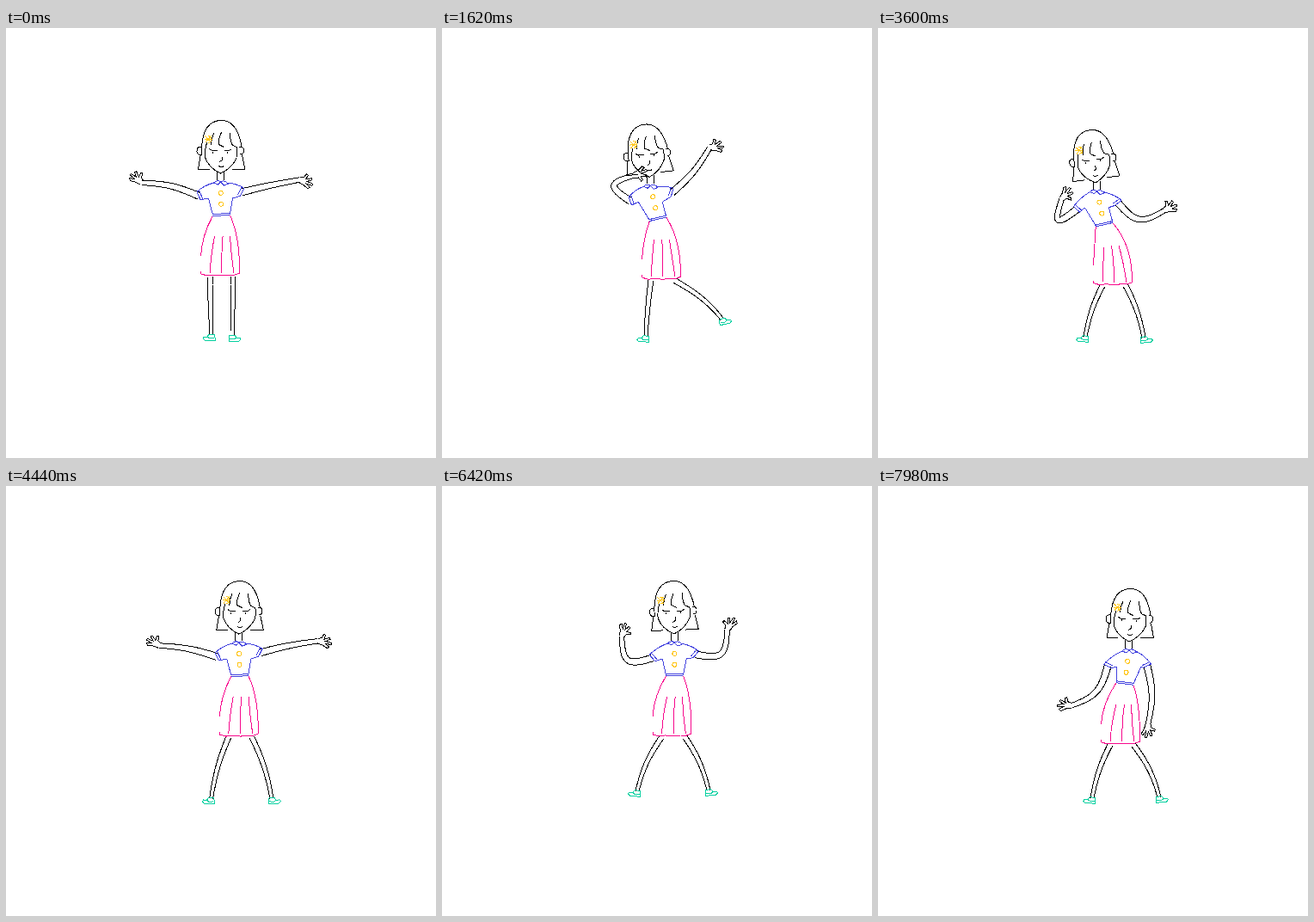
An HTML page for the animation above (8 s loop, 500x500 px).

```html
<!DOCTYPE html>
<html lang="en">
<head>
<meta charset="utf-8">
<title>Dancing girl</title>
<style>
html, body { margin: 0; width: 100%; height: 100%; overflow: hidden; background: #fff; }
svg { display: block; width: 100vw; height: 100vh; }
path { fill: none; stroke-width: 1; shape-rendering: crispEdges; }
.ink { stroke: #000; }
.shirt { stroke: #4343df; }
.skirt { stroke: #f7088c; }
.shoes { stroke: #06d0a0; }
.gold { stroke: #ffc619; }
</style>
</head>
<body>
<svg viewBox="0 0 500 500">
  <path id="limbs" class="ink"/>
  <path id="shoes" class="shoes"/>
  <path id="skirt" class="skirt"/>
  <path id="shirt" class="shirt"/>
  <path id="buttons" class="gold"/>
  <g id="head">
    <path class="ink" d="M-13 22H-26Q-24 8 -23 5M-22 -4Q-20 -35 1 -35Q16 -35 22 -15Q24 -9 24.5 -4M25 5L28.5 22H13"/>
    <path class="ink" d="M-22 -4Q-28 -5 -27.500 1Q-27 6 -22 5ZM22 -4Q28 -5 27 1Q26 5 23 4"/>
    <path class="ink" d="M-16 -9Q-19 2 -18 8Q-14 20 0 26.5Q13 21 19 8Q20 0 19 -4"/>
    <path class="ink" d="M-8 -20Q-11 -14 -11 -7M1 -21Q-3 -13 -2 -7L4 -4M11 -21Q11 -10 14 -6L19 -4"/>
    <path class="ink" d="M-13 -2L-10 0H-4M4 0H10L13 -2M-9 1v2M8 1v2M2 7V11L-1 13M-2 18q3 2 6 0"/>
    <path class="gold" d="M-18 -17L-11 -9M-11 -17L-18 -9M-19 -13H-10M-15 -17q4 0 4 4t-4 4"/>
  </g>
</svg>
<script>
const LOOP = 8000, STEP = 30;

// Arms out wide: time, head x, head y, left foot x, right foot x, foot y
const wide = (t, x, y, left, right, foot) =>
  [t, x, y, 0, x + 1, x, -18, -4, -30, -15, -8, 8, left, foot, right, foot];

// time | head x, y, tilt | waist x, hem x | left arm: upper, fore, hand | right arm | left foot | right foot
// Arm angles are measured from straight out to the side, positive downwards.
const poses = [
  [0, 249.5, 142.5, 0, 250.5, 249, -23, -3, -40, -14, -10, 17, 239, 357, 263, 358],
  wide(800, 243, 143, 237, 275, 359),
  [1620, 238.5, 147, -6, 251, 255, -33, -164, -162, -41, -59, -8, 237, 359, 326, 339],
  [2460, 288.5, 154, -5, 294, 291, -28, -162, -165, -36, -46, -3, 238, 354, 342, 357],
  [2790, 293, 155, -3, 296, 290, -15, -150, -155, -22, -22, 0, 239, 356, 338, 359],
  [3600, 250, 153.5, -7, 263, 273, 38, -108, -130, 50, -31, -27, 241, 359, 309, 360],
  wide(4110, 268, 147, 240, 309, 365),
  wide(4800, 274, 144, 237, 309, 362),
  [5280, 284.5, 148, 0, 281, 277, 25, -185, -170, 38, 107, 95, 234, 354, 308, 360],
  [5800, 276, 139, -1, 274, 272, -15, -60, -70, -12, -55, -50, 229, 356, 309, 358],
  [6420, 269, 145.5, -2, 270.5, 267.5, 18, -88, -110, 12, -88, -63, 227, 355, 310, 354],
  wide(6930, 283, 140, 238, 318, 359),
  [7980, 292.5, 154.5, 1, 287, 282, 75, 20, -4, 76, 102, 95, 249, 363, 327, 362]
];

const rad = deg => deg * Math.PI / 180;
const mix = (a, b, k) => a + (b - a) * k;
const mixPt = (a, b, k) => [mix(a[0], b[0], k), mix(a[1], b[1], k)];
const move = (p, x, y) => [p[0] + x, p[1] + y];
const txt = p => p[0].toFixed(1) + ' ' + p[1].toFixed(1);
const line = (...pts) => 'M' + pts.map(txt).join('L');
const quad = (a, c, b) => `M${txt(a)}Q${txt(c)} ${txt(b)}`;
const polar = (side, deg, r) => [side * r * Math.cos(rad(deg)), r * Math.sin(rad(deg))];
const turn = (x, y, angle) => [
  x * Math.cos(angle) - y * Math.sin(angle),
  x * Math.sin(angle) + y * Math.cos(angle)
];
const show = (id, d) => document.getElementById(id).setAttribute('d', d);

function poseAt(t) {
  let i = 0;
  while (i < poses.length - 2 && t >= poses[i + 1][0]) i++;
  const a = poses[i], b = poses[i + 1];
  const k = Math.min(1, (t - a[0]) / (b[0] - a[0]));
  return a.map((v, n) => mix(v, b[n], k * k * (3 - 2 * k)));
}

// Two outlines running along a limb that bends at a joint
function tube(start, joint, end, pull, wide, narrow) {
  const c1 = mixPt(start, joint, pull), c2 = mixPt(end, joint, pull);
  const at = k => {
    const p = mixPt(start, c1, k), q = mixPt(c1, c2, k), r = mixPt(c2, end, k);
    return mixPt(mixPt(p, q, k), mixPt(q, r, k), k);
  };
  const sides = [[], []];
  for (let i = 0; i <= 16; i++) {
    const k = i / 16, p = at(k), a = at(k - .01), b = at(k + .01);
    const angle = Math.atan2(b[1] - a[1], b[0] - a[0]), w = mix(wide, narrow, k);
    sides[0].push(move(p, -w * Math.sin(angle), w * Math.cos(angle)));
    sides[1].push(move(p, w * Math.sin(angle), -w * Math.cos(angle)));
  }
  return line(...sides[0]) + line(...sides[1]);
}

// Places a small outline, mirrored for the left side
const stamp = (shape, origin, side, angle) => line(...shape.map(([x, y]) => {
  const [px, py] = turn(x, y, angle);
  return move(origin, side * px, py);
}));

const HAND = [[0, -3], [4, -4], [6, -9], [8, -8], [7, -3], [13, -6], [14, -4], [9, -1],
  [16, 0], [16, 2], [9, 2], [14, 5], [12, 7], [6, 4], [0, 3]];
const SHOE = [[-3, -1], [-4, 3], [-4, 6], [8, 6], [10, 4], [9, 2], [5, 2], [3, -1], [-3, -1]];
const STRAP = [[-3, 3], [2, 4], [5, 2]];

function arm(side, collar, lean, [upper, fore, hand]) {
  const [sx, sy] = turn(side * (side < 0 ? 23 : 21), side < 0 ? 17 : 13, lean / 2);
  const shoulder = move(move(collar, sx, sy), ...polar(side, upper, side < 0 ? 3 : 4));
  const length = 34 + 2.5 * Math.abs(Math.sin(rad(fore - upper) / 2));
  const elbow = move(shoulder, ...polar(side, upper, length));
  const wrist = move(elbow, ...polar(side, fore, length));

  const cuff = polar(side, 123 + .41 * upper, 5);
  const top = move(shoulder, -cuff[0], -cuff[1]), bottom = move(shoulder, ...cuff);
  const inset = [-side * Math.abs(cuff[1]) * .6, -Math.abs(cuff[0]) * .6];
  const neck = move(collar, side * 8, 1), armpit = move(collar, side * 14, 19);
  return {
    ink: tube(shoulder, elbow, wrist, .85, 4, 2.7) + stamp(HAND, wrist, side, rad(hand)),
    sleeve: quad(neck, move(mixPt(neck, top, .5), side * 2, -2), top) +
      line(top, bottom, armpit) + line(move(top, ...inset), move(bottom, ...inset)),
    armpit
  };
}

function leg(side, hem, foot) {
  const hip = move(hem, side < 0 ? -12 : 15, 2);
  const dx = foot[0] - hip[0];
  const bulge = Math.min(8, Math.abs(dx) * .22);
  const knee = move(mixPt(hip, foot, .5), side * bulge, -bulge / 3);
  const tilt = -Math.max(0, side * Math.atan2(dx, foot[1] - hip[1])) * .25;
  return {
    ink: tube(hip, knee, foot, .75, 3, 2),
    shoe: stamp(SHOE, foot, side, tilt) + stamp(STRAP, foot, side, tilt)
  };
}

function drawSkirt(waist, belt, hem) {
  const at = (x, y) => move(hem, x, y);
  const left = move(waist, -belt[0], -belt[1] + 1), right = move(waist, belt[0], belt[1] + 1);
  const middle = mixPt(waist, hem, .6)[0];
  const pleats = [[-7, -12], [2.5, 2], [11, 16]].map(([top, bottom]) =>
    quad([middle + top, waist[1] + 25], [hem[0] + (top + bottom) / 2 - 1, waist[1] + 45], at(bottom, -2)));
  show('skirt', quad(left, at(-21, -46), at(-22.5, -22)) +
    quad(right, at(23, -45), at(22.5, -2)) + pleats.join('') +
    line(at(-22.5, -4), at(-22, -1), at(-15, 1), at(-8, 0), at(2, 1), at(10, 0), at(17, 0), at(22.5, -2)));
}

function draw(t) {
  const [, hx, hy, tilt, waistX, hemX, ...rest] = poseAt(t);
  const collar = move([hx, hy], ...turn(0, 36.5, rad(tilt)));
  const waist = [waistX, collar[1] + 38], hem = [hemX, collar[1] + 108];
  const lean = -Math.atan2(waist[0] - collar[0], 38);
  const belt = turn(10, 0, lean);
  const at = (x, y) => move(collar, x, y);

  const arms = [arm(-1, collar, lean, rest.slice(0, 3)), arm(1, collar, lean, rest.slice(3, 6))];
  const legs = [leg(-1, hem, rest.slice(6, 8)), leg(1, hem, rest.slice(8, 10))];
  const left = move(waist, -belt[0], -belt[1]), right = move(waist, ...belt);

  document.getElementById('head').setAttribute('transform',
    `translate(${hx.toFixed(1)} ${hy.toFixed(1)}) rotate(${tilt.toFixed(2)})`);
  show('limbs', [...arms, ...legs].map(part => part.ink).join('') +
    line(at(-4, -12), at(-4, -2)) + line(at(4, -12), at(4, -2)));
  show('shoes', legs.map(part => part.shoe).join(''));
  show('shirt', arms.map(part => part.sleeve).join('') +
    line(arms[0].armpit, left) + line(arms[1].armpit, right) +
    line(move(left, 0, -1), move(right, 0, -1)) + line(move(left, 0, 1), move(right, 0, 1)) +
    quad(at(-8, 1), at(-4, -3), at(0, 0)) + quad(at(0, 0), at(4, -3), at(9, 2)) +
    line(at(-8, 1), at(-3, 3), at(0, 0), at(4, 4), at(9, 2)));
  show('buttons', [.34, .68].map(k =>
    `M${txt(move(mixPt(collar, waist, k), -2.5, 0))}a2.5 2.5 0 1 1 5 0a2.5 2.5 0 1 1 -5 0`).join(''));
  drawSkirt(waist, belt, hem);
}

const begin = performance.now();
function tick() {
  const t = (performance.now() - begin) % LOOP;
  draw(Math.floor(t / STEP) * STEP);
  requestAnimationFrame(tick);
}
tick();
</script>
</body>
</html>
```
